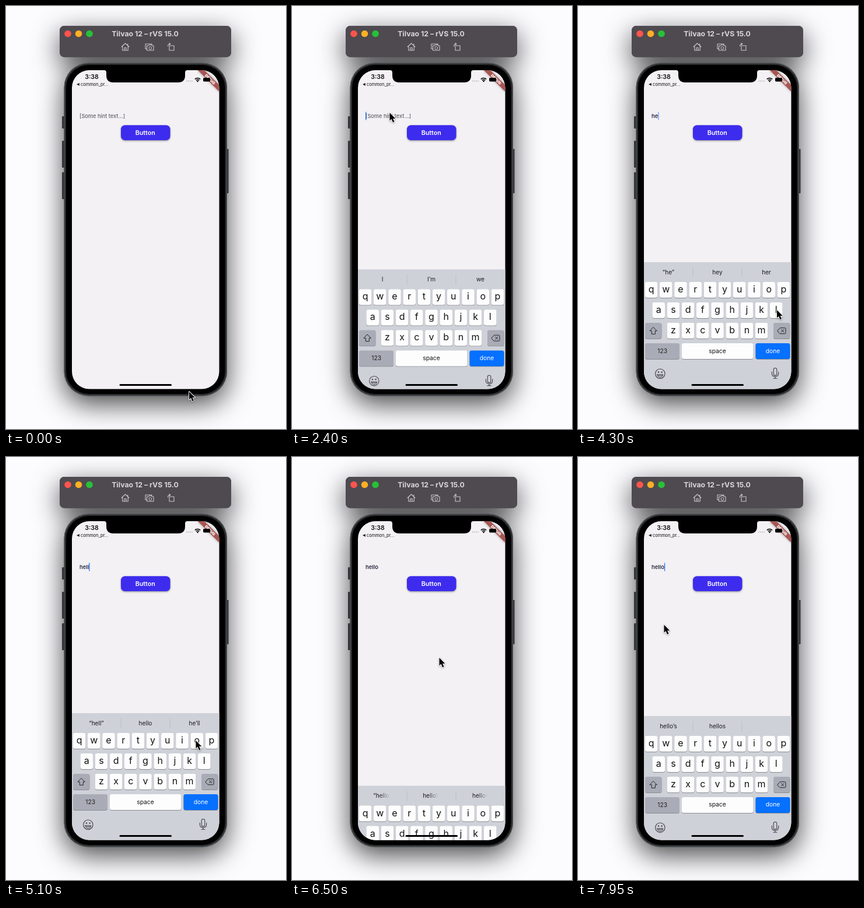
An HTML page with a canvas for the animation above (8000 ms loop, 480 by 725 pixels).

```html
<!DOCTYPE html>
<html lang="en">
<head>
<meta charset="utf-8">
<title>Text field demo</title>
<style>
  html, body { margin: 0; width: 100%; height: 100%; overflow: hidden; background: #fcfbfe; }
  canvas { display: block; width: 480px; height: 725px; }
</style>
</head>
<body>
<canvas id="stage"></canvas>
<script>
const W = 480, H = 725, LOOP = 8000;
const SANS = 'Inter, Roboto, sans-serif';
const scale = window.devicePixelRatio || 1;
const FOCUS = 2150, BLUR = 6396, REFOCUS = 7640;

// Pointer moves: start, end, destination
const START = [314, 661];
const MOVES = [
  [850, 1650, 167.5, 183],
  [2600, 3100, 264, 521],
  [3250, 3510, 180, 498],
  [3850, 4300, 341, 521],
  [4750, 5050, 325.5, 486],
  [5500, 6200, 252.5, 344],
  [6900, 7450, 160, 188],
  [7680, 7930, 147.5, 287.5]
];

// Typed text and keyboard suggestions after each event
const STATES = [
  [0, '', ['I', 'I’m', 'we']],
  [3260, 'h', ['“h”', 'have', 'he']],
  [3750, 'he', ['“he”', 'hey', 'her']],
  [4400, 'hel', ['“hel”', 'help', 'hello']],
  [4650, 'hell', ['“hell”', 'hello', 'he’ll']],
  [5250, 'hello', ['“hello”', 'hello’s', 'hellos']],
  [BLUR, 'hello', ['', '', '']],
  [REFOCUS, 'hello', ['hello’s', 'hellos', '']]
];

function makeCanvas(el) {
  el.width = W * scale;
  el.height = H * scale;
  const c = el.getContext('2d');
  c.scale(scale, scale);
  return c;
}

const stage = document.getElementById('stage');
const view = makeCanvas(stage);
const backdrop = document.createElement('canvas');
let g = makeCanvas(backdrop);

const clamp = v => Math.max(0, Math.min(1, v));
const smooth = v => { v = clamp(v); return v * v * (3 - 2 * v); };
const spring = ms => {
  const a = Math.max(0, ms) * 0.01826;
  return 1 - (1 + a) * Math.exp(-a);
};

function rounded(x, y, w, h, r, fill) {
  g.beginPath();
  g.roundRect(x, y, w, h, r);
  if (fill) { g.fillStyle = fill; g.fill(); }
}

function disc(x, y, r, fill) {
  g.beginPath();
  g.arc(x, y, r, 0, Math.PI * 2);
  g.fillStyle = fill;
  g.fill();
}

function label(str, x, y, size, weight, color, align = 'center') {
  g.font = `${weight} ${size}px ${SANS}`;
  g.textAlign = align;
  g.fillStyle = color;
  g.fillText(str, x, y);
}

function line(d, color, width, x = 0, y = 0) {
  g.save();
  g.translate(x, y);
  g.strokeStyle = color;
  g.lineWidth = width;
  g.lineJoin = g.lineCap = 'round';
  g.stroke(new Path2D(d));
  g.restore();
}

function shadow(color, blur, dy) {
  g.shadowColor = color;
  g.shadowBlur = blur * scale;
  g.shadowOffsetY = dy * scale;
}

function drawToolbar() {
  rounded(92, 34, 294, 53.5, 8, '#4e4a4f');
  ['#ff544d', '#ffb024', '#27c138'].forEach((c, i) => disc(106 + 18.5 * i, 47.5, 5.8, c));
  label('Tilvao 12 – rVS 15.0', 238.5, 52, 12.3, 700, '#d8d6d9');
  const ink = '#cbc9cc';
  line('M-6.5 0L0-6L6.5 0M-4.7-1V6H4.7V-1M-1.5 6V1.5H1.5V6M4.2-5V-2.5', ink, 1.1, 204.5, 70);
  line('M-5 3H-7V-5.5H4V-4M-4.5-2.5H-1.5L-.3-4H3.3L4.5-2.5H7V5.5H-4.5Z', ink, 1.1, 246, 70.5);
  g.beginPath();
  g.arc(247.3, 72, 2.4, 0, Math.PI * 2);
  g.strokeStyle = ink;
  g.stroke();
  line('M-3-2.5H5V5.5H-3ZM-5.5-1.5Q-5.5-5.5-1.5-5.5M-3-7L-1.2-5.5L-3-4', ink, 1.1, 283, 70.5);
}

function drawBody() {
  [[189, 21], [231, 46], [285, 46]].forEach(([y, h]) => rounded(96, y, 6, h, 1, '#323437'));
  rounded(376, 245, 5.5, 76, 1, '#323437');
  rounded(99.5, 97.5, 279.5, 571, 42, '#505355');
  rounded(100.8, 98.8, 277, 568.4, 41, '#2a2c2e');
  rounded(103, 101, 272.5, 564, 39, '#000');
}

function drawBackdrop() {
  g.fillStyle = '#fcfbfe';
  g.fillRect(0, 0, W, H);
  shadow('rgba(0,0,0,.72)', 46, 14);
  g.beginPath();
  g.roundRect(92, 34, 294, 53.5, 8);
  g.roundRect(99.5, 97.5, 279.5, 571, 42);
  g.fillStyle = '#444';
  g.fill();
  shadow('transparent', 0, 0);
  drawToolbar();
  drawBody();
  rounded(113, 110, 252.5, 546.5, 30, '#f3f1f4');
  shadow('rgba(0,0,0,.4)', 3, 1.2);
  rounded(197, 204.3, 84.5, 25.7, 7, '#3d2cee');
  shadow('transparent', 0, 0);
  label('Button', 238.7, 221, 10.7, 600, '#fff');
  drawStatus();
}

function drawStatus() {
  g.save();
  rounded(113, 110, 252.5, 546.5, 30);
  g.clip();

  g.save();
  g.translate(365.5, 110);
  g.rotate(Math.PI / 4);
  shadow('rgba(0,0,0,.4)', 4, 0);
  g.fillStyle = '#a95552';
  g.fillRect(-26, 18.1, 52, 7.8);
  shadow('transparent', 0, 0);
  label('DEBUG', 0, 24.4, 6.4, 900, '#fff');
  g.restore();

  g.fillStyle = '#000';
  g.fill(new Path2D('M168 110Q172 110 172 114V119Q172 131 184 131H295Q307 131 307 119V114Q307 110 311 110Z'));
  label('3:38', 147, 125.3, 10.6, 600, '#111');
  g.fill(new Path2D('M121 134.3L125.8 131.9V136.7Z'));
  label('common_pr...', 128, 137, 7.4, 400, '#111', 'left');
  for (let i = 0; i < 4; i++) disc(310 + 3 * i, 128.5, 0.85, '#a5a3a7');

  g.strokeStyle = '#000';
  g.lineWidth = 1.6;
  for (const r of [3.7, 6.5]) {
    g.beginPath();
    g.arc(328.5, 130, r, -Math.PI * 0.76, -Math.PI * 0.24);
    g.stroke();
  }
  disc(328.5, 129, 1.3, '#000');
  rounded(338, 123, 12, 6.5, 1.8, '#000');
  rounded(350.6, 125, 1, 2.5, 0.5, '#777');
  g.restore();
}

function key(x, y, w, fill = '#fdfdfe') {
  rounded(x, y + 0.9, w, 27, 3.4, '#898b92');
  rounded(x, y, w, 27, 3.4, fill);
}

function letterRow(letters, x, y) {
  [...letters].forEach((ch, i) => {
    const left = x + 25.2 * i;
    key(left, y, 21.6);
    label(ch, left + 10.8, y + 18, 16, 400, '#111');
  });
}

// Reveals the leading part of a word with a soft right edge
function wipedWord(word, x, y, shown) {
  if (!word) return;
  g.font = `400 10.1px ${SANS}`;
  const w = g.measureText(word).width;
  const edge = -0.3 + 1.6 * shown;
  const fade = g.createLinearGradient(x - w / 2, 0, x + w / 2, 0);
  const a = clamp(edge - 0.3), b = clamp(edge + 0.3);
  const alpha = p => clamp((edge + 0.3 - p) / 0.6);
  for (const p of [0, a, b, 1]) fade.addColorStop(p, `rgba(25,25,28,${alpha(p)})`);
  label(word, x, y, 10.1, 400, fade);
}

function drawSuggestions(t, n, y) {
  const [since, , words] = STATES[n];
  const old = n ? STATES[n - 1][2] : ['', '', ''];
  const age = t - since;
  words.forEach((word, i) => {
    const x = 155 + 84 * i;
    const instant = !old[i] || (i === 0 && word);
    if (instant) wipedWord(word, x, y, 1);
    else if (age < 250) wipedWord(old[i], x, y, 1 - age / 250);
    else wipedWord(word, x, y, clamp((age - 250) / 150));
  });
}

function drawKeyboard(t, n) {
  const up = spring(t - FOCUS) - spring(t - BLUR) + spring(t - REFOCUS);
  if (up < 0.001) return;
  const top = 657 - 218 * up;
  g.save();
  rounded(113, 110, 252.5, 546.5, 30);
  g.clip();
  g.translate(0, top);
  g.fillStyle = '#cfd1d8';
  g.fillRect(113, 0, 253, 230);
  g.fillStyle = '#b9bbc2';
  g.fillRect(196.6, 9, 0.8, 17);
  g.fillRect(280.6, 9, 0.8, 17);
  drawSuggestions(t, n, 20.6);

  letterRow('qwertyuiop', 114.8, 34);
  letterRow('asdfghjkl', 127.4, 69);
  letterRow('zxcvbnm', 152.6, 104);
  const gray = '#a9acb6', ink = '#3e4045';
  key(115, 104, 28.5, gray);
  key(335, 104, 28.5, gray);
  key(115, 139, 59, gray);
  key(178, 139, 122.5);
  key(304.5, 139, 59, '#0670ff');
  label('123', 144.7, 156, 10.3, 400, '#222');
  label('space', 239, 155.5, 10.3, 400, '#111');
  label('done', 334, 155.5, 10.3, 400, '#fff');
  line('M0-6L6 0H3V5.5H-3V0H-6Z', '#222', 1, 129.3, 117.8);
  line('M-7 0L-2.5-5H5.5Q7-5 7-3.5V3.5Q7 5 5.5 5H-2.5ZM-.5-2.2L3.9 2.2M3.9-2.2L-.5 2.2', '#222', 1, 349, 117.7);

  g.beginPath();
  g.arc(140.8, 191.2, 8.2, 0, Math.PI * 2);
  g.strokeStyle = ink;
  g.lineWidth = 1.1;
  g.stroke();
  disc(138, 188.5, 1.2, ink);
  disc(143.6, 188.5, 1.2, ink);
  line('M-5 1.5H5Q4.2 6 0 6Q-4.2 6-5 1.5ZM-4 3.2H4', ink, 1, 140.8, 191.2);
  rounded(335.2, 181.5, 5.6, 12.5, 2.8);
  g.strokeStyle = ink;
  g.stroke();
  line('M-5.7-2V1Q-5.7 6 0 6Q5.7 6 5.7 1V-2M0 6V9M-3 9.2H3', ink, 1.1, 338, 190);
  g.restore();
}

function drawField(t, n) {
  const text = STATES[n][1];
  const hint = 1 - clamp((t - STATES[1][0]) / 220);
  g.globalAlpha = hint;
  label('[Some hint text...]', 126, 191.6, 9.2, 500, '#656268', 'left');
  g.globalAlpha = 1;
  label(text, 126, 191.6, 9.4, 600, '#2b2940', 'left');

  const focused = (t >= FOCUS && t < BLUR) || t >= REFOCUS;
  if (!focused) return;
  const last = Math.max(STATES[n][0], t >= REFOCUS ? REFOCUS : FOCUS);
  const phase = (t - last) % 1000;
  g.globalAlpha = phase < 500 ? 1 : clamp(1 - (phase - 500) / 150) + clamp((phase - 850) / 150);
  g.fillStyle = '#1678f5';
  g.fillRect(126 + g.measureText(text).width, 181.5, 1.3, 14);
  g.globalAlpha = 1;
}

function drawPointer(t) {
  let [x, y] = START;
  for (const [from, to, nx, ny] of MOVES) {
    const p = smooth((t - from) / (to - from));
    x += (nx - x) * p;
    y += (ny - y) * p;
  }
  g.save();
  g.translate(x, y);
  const arrow = new Path2D('M0 0V13.6L3.1 10.8L5.5 16.4L8 15.3L5.6 9.9H9.8Z');
  shadow('rgba(0,0,0,.35)', 3, 1);
  g.strokeStyle = '#fff';
  g.lineWidth = 1.8;
  g.lineJoin = 'round';
  g.stroke(arrow);
  shadow('transparent', 0, 0);
  g.fillStyle = '#000';
  g.fill(arrow);
  g.restore();
}

function render(t) {
  let n = 0;
  while (n + 1 < STATES.length && t >= STATES[n + 1][0]) n++;
  g.drawImage(backdrop, 0, 0, W, H);
  drawField(t, n);
  drawKeyboard(t, n);
  rounded(194.5, 648, 89.5, 3, 1.5, '#000');
  drawPointer(t);
}

drawBackdrop();
g = view;
const began = performance.now();
function tick() {
  render((performance.now() - began) % LOOP);
  requestAnimationFrame(tick);
}
tick();
</script>
</body>
</html>
```
